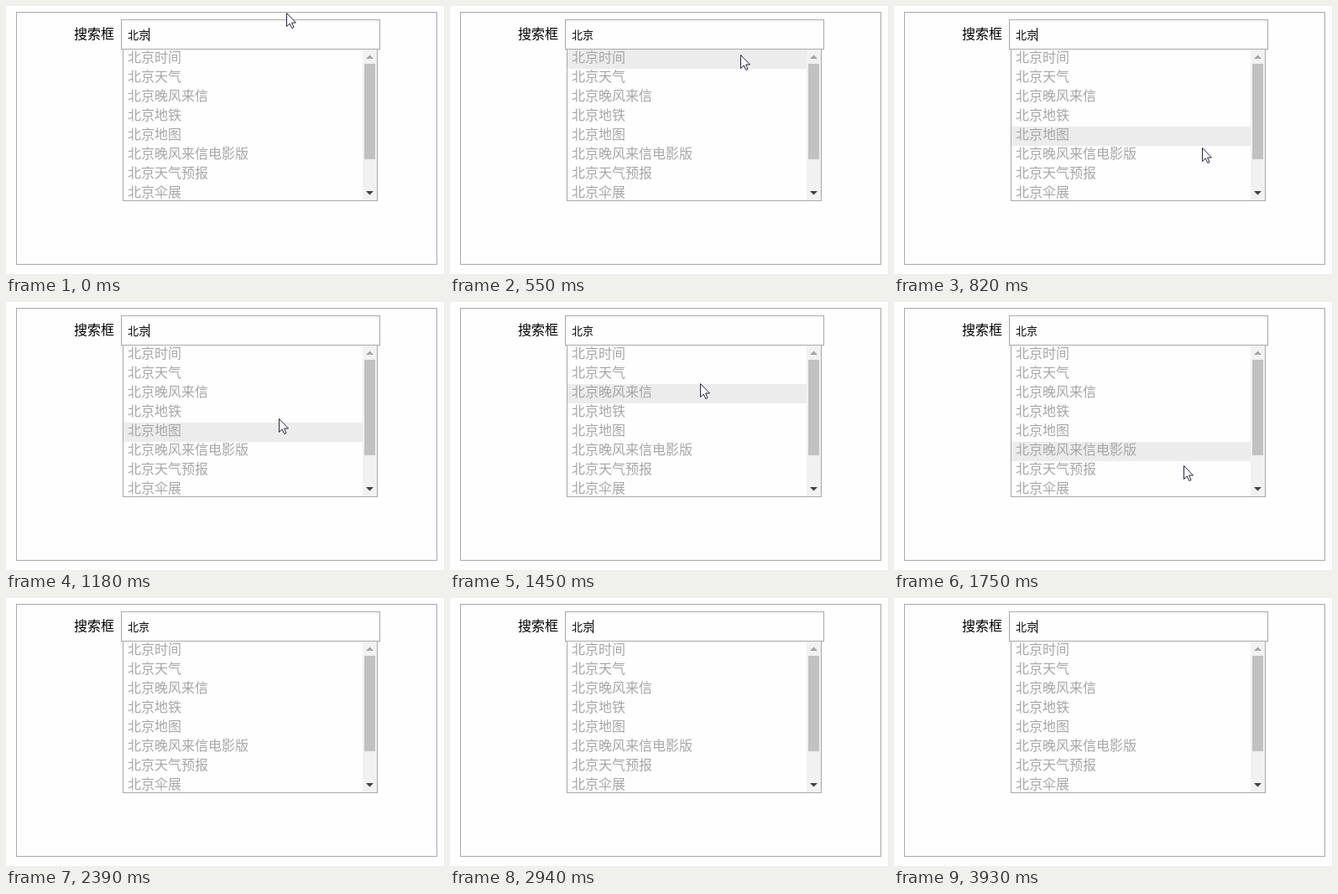
Write an HTML page that moves like this. It is 522x320 px and loops after 4080 ms.

```html
<!DOCTYPE html>
<html lang="zh-CN">
<head>
<meta charset="utf-8">
<title>搜索框</title>
<style>
  html, body { margin: 0; width: 100%; height: 100%; overflow: hidden; background: #fefefe; }
  svg { display: block; }
  text { font: 16px "Noto Sans CJK SC", "Noto Sans CJK", sans-serif; }
  .box { fill: #fefefe; stroke: #a9a9a9; }
  .list text { fill: #a6a6a6; }
  .query { font-size: 13px; }

  .caret, .hover, .pointer { animation: 4080ms step-end infinite; }
  .caret { animation-name: blink; }
  .hover { animation-name: hover; }
  .pointer { animation-name: point; }

  @keyframes blink {
    0%, 20.098%, 45.833%, 72.058%, 96.323% { opacity: 1; }
    10.539%, 32.598%, 58.578%, 85.784% { opacity: 0; }
    100% { opacity: 1; }
  }

  /* rows are 23px apart; -30px parks the bar outside the list */
  @keyframes hover {
    0%, 23.039%, 45.833%, 100% { transform: translateY(-30px); }
    13.480% { transform: translateY(0); }
    16.421%, 39.215% { transform: translateY(23px); }
    35.539% { transform: translateY(46px); }
    32.598% { transform: translateY(69px); }
    20.098%, 28.921% { transform: translateY(92px); }
    42.892% { transform: translateY(115px); }
    25.980% { transform: translateY(161px); }
  }

  @keyframes point {
    0% { transform: translate(334px, 8px); }
    6.862% { transform: translate(337px, 7px); }
    10.539% { transform: translate(341px, 5px); }
    13.480% { transform: translate(346px, 58px); }
    16.421% { transform: translate(354px, 88px); }
    20.098% { transform: translate(367px, 169px); }
    23.039% { transform: translate(420px, 271px); }
    25.980% { transform: translate(376px, 208px); }
    28.921% { transform: translate(325px, 139px); }
    32.598% { transform: translate(309px, 116px); }
    35.539% { transform: translate(298px, 97px); }
    39.215% { transform: translate(302px, 87px); }
    42.892% { transform: translate(345px, 195px); }
    45.833% { transform: translate(384px, 264px); }
    48.774% { transform: translate(414px, 319px); }
    52.451%, 100% { transform: translate(414px, 330px); }
  }
</style>
</head>
<body>
<svg width="522" height="320" viewBox="0 0 522 320">
  <rect class="box" x="12.5" y="7.5" width="501" height="301"/>
  <text x="81" y="39">搜索框</text>

  <rect class="box" x="139.5" y="51.5" width="303" height="181"/>
  <svg class="list" x="140" y="52" width="285" height="180">
    <rect class="hover" width="285" height="23" fill="#ececec"/>
    <g id="rows"></g>
  </svg>

  <g class="scrollbar">
    <rect x="425" y="52" width="17" height="180" fill="#f1f1f1"/>
    <rect x="427" y="69" width="13" height="114" fill="#c1c1c1"/>
    <path d="M429 63l4.5-4.5 4.5 4.5z" fill="#a3a3a3"/>
    <path d="M429 221l4.5 4.5 4.5-4.5z" fill="#404040"/>
  </g>

  <rect class="box" x="137.5" y="16.5" width="308" height="35"/>
  <text class="query" x="145" y="39">北京</text>
  <rect class="caret" x="170" y="26" width="1" height="16"/>

  <path class="pointer" d="M.5 .5V16.5L4.2 13 6.8 18.5 9 17.5 6.6 12H11.5Z" fill="#fff" stroke="#25253f"/>
</svg>
<script>
  const items = ['时间', '天气', '晚风来信', '地铁', '地图', '晚风来信电影版', '天气预报', '伞展'];
  const rows = document.getElementById('rows');
  items.forEach((item, i) => {
    const row = document.createElementNS(rows.namespaceURI, 'text');
    row.setAttribute('x', 5);
    row.setAttribute('y', 15 + 23 * i);
    row.textContent = '北京' + item;
    rows.append(row);
  });
</script>
</body>
</html>
```
